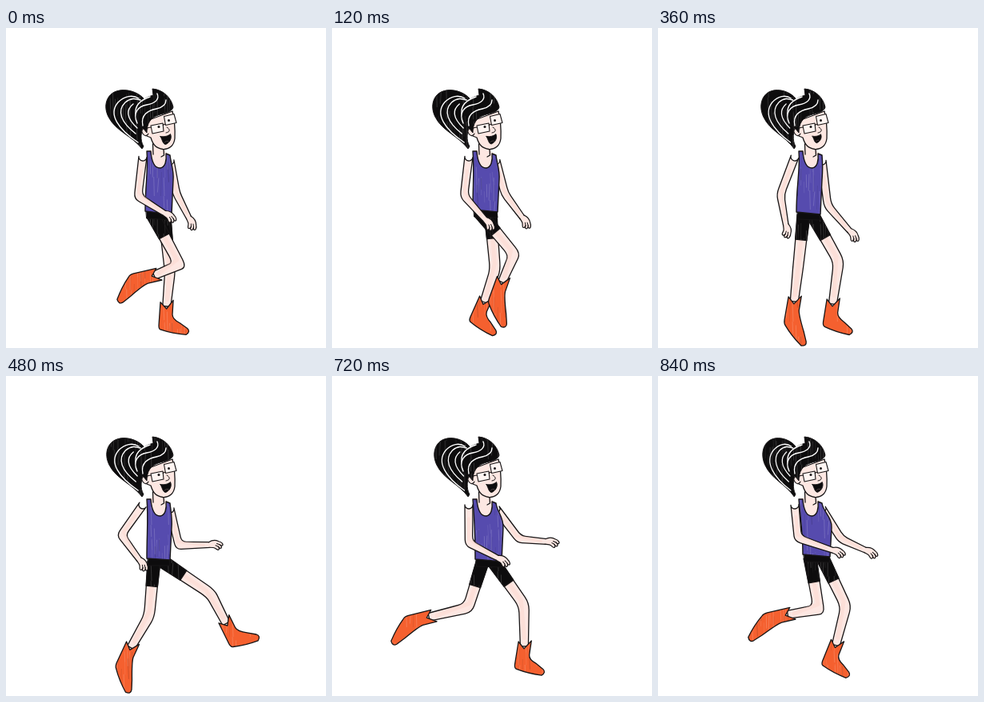
An HTML page that plays this animation: 400x400 px, repeating every 960 ms.

```html
<!DOCTYPE html>
<html lang="en">
<head>
<meta charset="utf-8">
<title>Runner</title>
<style>
html, body { margin: 0; width: 100%; height: 100%; overflow: hidden; background: #fff; }
svg { display: block; width: 100%; height: 100%; }
</style>
</head>
<body>
<svg viewBox="0 0 400 400" stroke-linejoin="round" stroke-linecap="round">
  <defs>
    <pattern id="grain" width="34" height="70" patternUnits="userSpaceOnUse"></pattern>
  </defs>
  <g id="runner"></g>
</svg>
<script>
const STEP = 120;
const INK = '#171516', SKIN = '#fde7e2', BLUSH = '#f8cfc6', BLUE = '#564bae', ORANGE = '#f5602f', HAIR = '#0d0c0d';
const runner = document.getElementById('runner');
const grain = document.getElementById('grain');

// Leg: knee x y, boot top x y, shaft angle, sole angle
const nearLeg = [
  [217, 296, 190, 308, 165, 117],
  [228, 283, 214, 313, 108, 62],
  [228, 265, 234, 285, 70, 30],
  [175, 300, 171, 337, 98, 52],
  [179, 300, 158, 335, 113, 68],
  [172, 297, 136, 316, 147, 101],
  [170, 290, 126, 300, 164, 119],
  [201, 292, 167, 297, 165, 123]
];
const farLeg = [
  [205, 305, 201, 343, 92, 11],
  [204, 302, 192, 338, 112, 32],
  [201, 300, 180, 332, 132, 52],
  [226, 292, 219, 340, 97, 18],
  [256, 272, 273, 305, 62, -14],
  [241, 283, 255, 332, 85, 3],
  [240, 286, 241, 333, 97, 14],
  [235, 288, 224, 332, 110, 28]
];
// Arm: elbow x y, wrist x y
const nearArm = [
  [165, 211, 199, 232], [165, 210, 192, 240], [167, 210, 184, 248], [153, 208, 160, 247],
  [144, 199, 167, 230], [168, 215, 195, 238], [171, 209, 208, 228], [175, 203, 219, 218]
];
const farArm = [
  [213, 207, 229, 238], [216, 207, 238, 237], [219, 207, 248, 235], [212, 222, 240, 254],
  [216, 212, 255, 211], [236, 204, 271, 195], [234, 204, 268, 207], [229, 204, 260, 218]
];
// Vest hem: left x y, right x y
const hem = [
  [174, 229, 207, 233], [176, 227, 207, 230], [177, 225, 207, 227], [173, 230, 203, 233],
  [176, 228, 205, 230], [177, 234, 210, 237], [179, 229, 212, 232], [181, 223, 215, 226]
];
const tailLeft = [125, 126, 127, 129, 126, 125, 128, 131];
const mouthSize = [1, .95, .92, .84, 1, 1.05, 1, .98];

const n = v => v.toFixed(1);
const P = p => n(p[0]) + ' ' + n(p[1]);
const mix = (a, b, t) => [a[0] + (b[0] - a[0]) * t, a[1] + (b[1] - a[1]) * t];
const dir = (a, b) => { const x = b[0] - a[0], y = b[1] - a[1], d = Math.hypot(x, y); return [x / d, y / d]; };
const polar = deg => [Math.cos(deg * Math.PI / 180), Math.sin(deg * Math.PI / 180)];
const move = (p, u, a, v = u, b = 0) => [p[0] + u[0] * a + v[0] * b, p[1] + u[1] * a + v[1] * b];
const path = (d, fill = 'none', stroke = INK, w = 1.3) =>
  `<path d="${d}" fill="${fill}" stroke="${stroke}" stroke-width="${w}"/>`;
const crayon = (d, fill, w) => path(d, fill, 'none', 0) + path(d, 'url(#grain)', INK, w);

// Tapered two-segment limb with a softened joint
function limb(a, b, c, wa, wb, wc) {
  const u = dir(a, b), v = dir(b, c);
  const nu = [-u[1], u[0]], nv = [-v[1], v[0]];
  const m = dir([0, 0], [nu[0] + nv[0], nu[1] + nv[1]]);
  const k = wb / Math.max(.7, m[0] * nu[0] + m[1] * nu[1]);
  const side = s => [move(a, nu, s * wa), move(b, m, s * k), move(c, nv, s * wc)];
  const [l0, l1, l2] = side(1), [r0, r1, r2] = side(-1);
  const d = `M${P(l0)}L${P(mix(l0, l1, .86))}Q${P(l1)} ${P(mix(l1, l2, .16))}L${P(l2)}L${P(r2)}` +
    `L${P(mix(r2, r1, .84))}Q${P(r1)} ${P(mix(r1, r0, .14))}L${P(r0)}A${wa} ${wa} 0 0 1 ${P(l0)}Z`;
  const shade = `M${P(mix(a, b, .35))}L${P(mix(a, b, .9))}L${P(mix(b, c, .8))}`;
  return path(d, SKIN) + `<g opacity=".35">${path(shade, 'none', BLUSH, wc)}</g>`;
}

function hand(from, wrist, flip) {
  const u = dir(from, wrist), deg = Math.atan2(u[1], u[0]) * 180 / Math.PI;
  return `<g transform="translate(${P(wrist)}) rotate(${n(deg)}) scale(1 ${flip})">` +
    path('M-1.5 -3.2C3 -6 8 -5.5 11 -4C15 -3 17 0 15.5 1.2C14.5 2 13 .5 12 0C15 2 15 4.5 13 4.8C12 5 11 3 10 2.4' +
      'C12 4.5 11.5 6.8 9.8 6.6C7.5 6.2 7 4 4 3.6L-1.5 3.2', SKIN, INK, 1.2) +
    path('M12 0L8.5 -1.2M10 2.4L7 1', 'none', INK, 1) + '</g>';
}

function arm(shoulder, [ex, ey, wx, wy], flip) {
  return limb(shoulder, [ex, ey], [wx, wy], 5, 4.6, 3.3) + hand([ex, ey], [wx, wy], flip);
}

function boot(top, shaft, sole) {
  const u = polar(shaft), v = [u[1], -u[0]], f = polar(sole), up = [f[1], -f[0]];
  const at = (a, b) => move(top, u, a, v, b);
  const heel = at(34, -9), toe = move(heel, f, 37);
  const d = `M${P(at(0, -8))}L${P(at(8, 0))}L${P(at(-3, 8))}L${P(at(15, 7.5))}` +
    `Q${P(at(21, 8))} ${P(move(heel, f, 24, up, 13))}L${P(move(toe, up, 8, f, -2))}` +
    `Q${P(move(toe, up, 5, f, 3))} ${P(move(toe, f, -2))}` +
    `Q${P(move(heel, f, 18, up, -2))} ${P(move(heel, f, 3))}Q${P(heel)} ${P(at(29, -9))}Z`;
  return crayon(d, ORANGE, 1.3);
}

function leg(hip, [kx, ky, ax, ay, shaft, sole], hipW) {
  const knee = [kx, ky], top = [ax, ay], u = dir(hip, knee), s = [-u[1], u[0]];
  const end = move(hip, u, 31);
  const cuff = `M${P(move(hip, s, hipW))}L${P(move(end, s, 7.2))}L${P(move(end, s, -7.2))}L${P(move(hip, s, -hipW))}Z`;
  return limb(hip, knee, move(top, polar(shaft), 5), 7.5, 6.4, 5) +
    boot(top, shaft, sole) + path(cuff, HAIR) + path(cuff, 'url(#grain)', 'none', 0);
}

function vest([lx, ly, rx, ry]) {
  return path('M176 155L184 150L198 153L206 160L206 180L177 180Z', SKIN, 'none', 0) +
    crayon(`M176 154L181 154C182 167 186 175.5 193 175C199 174 201 166 200 157L205 159` +
      `C206 169 ${rx + 3} 177 ${rx + 2} 190L${rx} ${ry}L${lx} ${ly}C${lx} 195 178 178 176 154Z`, BLUE, 1.4);
}

function head(i) {
  const sx = (172 - tailLeft[i]) / 47;
  const tail = 'M172 88C165 80 150 75 138 79C126 83 121 97 128 111C137 129 158 135 170 151L172 148C167 140 169 130 172 120Z';
  const strands = ['M165 143C141 127 127 108 140 93C148 85 158 83 166 88',
    'M162 132C144 118 138 104 149 93C156 87 162 88 168 90', 'M164 125C150 112 150 102 159 95'];
  const fringe = 'M162 114C160 99 167 89 184 84L183 76C197 77 207 88 209 99C207 106 198 106 190 109' +
    'C181 112 176 119 176 131L172 126C168 123 164 120 162 114Z';
  const white = d => path(d, 'none', '#fff', 1.4);
  return path('M183 138L183 160L198 163L198 148Z', SKIN, 'none', 0) +
    path('M183.5 145L184 158M197 151L197.5 159L194 161') +
    `<g transform="translate(172 0) scale(${n(sx * 100) / 100} 1) translate(-172 0)">` +
    crayon(tail, HAIR, 1) + strands.map(white).join('') + '</g>' +
    path('M176 116L208 104C210 112 211.5 126 211 138C210 147 204 152 196 151.5C188 150 184 147 181 137L176 135Z', SKIN) +
    path('M177 126C172 123 168 128 171 132C173 136 177 135 178 132', SKIN, INK, 1.1) +
    crayon(fringe, HAIR, 1) +
    ['M164 119C158 106 165 98 176 96C187 94 192 89 189 82', 'M171 122C168 108 178 103 188 101C197 99 200 95 200 90',
      'M162 107C161 97 168 90 180 86'].map(white).join('') +
    path('M181 122L196 119L197 129L183 132ZM197.5 110.5L210 107.5L213 118.5L199.5 121.5ZM196 121.5L199 120M181 124L176 125', '#fff5f2', INK, 1.1) +
    `<circle cx="191" cy="123.5" r="1.5" fill="${INK}"/><circle cx="203.5" cy="115.5" r="1.5" fill="${INK}"/>` +
    path('M201 124C205 126 206 130 200 131', 'none', INK, 1) +
    `<g transform="translate(193 134) scale(${mouthSize[i]})">` +
    path('M0 1.5C5 2.5 10 1 12.5 -1.5C15 4 11 10 6.5 11.5C3 11 3 7 0 1.5Z', HAIR, INK, 1) +
    path('M5 9.3C6 7.5 8.5 7 10 7.6', 'none', '#5a4a4c', .9) + '</g>';
}

// Pencil streaks, repeated over every coloured area
function makeGrain() {
  let seed = 11, out = '';
  const rnd = () => (seed = seed * 16807 % 2147483647) / 2147483647;
  for (let k = 0; k < 20; k++) {
    const x = rnd() * 34, y = rnd() * 50, h = 10 + rnd() * 22;
    out += `<g opacity="${n(.1 + rnd() * .12)}">${path(`M${n(x)} ${n(y)}l${n(rnd() * 3 - 1.5)} ${n(h)}`, 'none', k % 4 ? '#fff' : '#000', .8)}</g>`;
  }
  grain.innerHTML = out;
}

function draw(i) {
  const h = hem[i];
  const nearHip = [h[0] + 9, h[1] + 4], farHip = [h[2] - 9, h[3] + 2];
  grain.setAttribute('patternTransform', `translate(${i * 13 % 34} ${i * 29 % 70})`);
  runner.innerHTML =
    arm([205, 166], farArm[i], 1) +
    leg(farHip, farLeg[i], 8) +
    leg(nearHip, nearLeg[i], 8) +
    path(`M${h[0] + 1} ${h[1] - 3}L${h[2] - 1} ${h[3] - 3}L${h[2]} ${h[3] + 7}L${h[0] + 2} ${h[1] + 9}Z`, HAIR, INK, 1) +
    vest(h) +
    arm([171, 161], nearArm[i], 1) +
    head(i);
}

let shown = -1;
const start = performance.now();
function tick() {
  const i = Math.floor(Math.max(0, performance.now() - start) / STEP) % hem.length;
  if (i !== shown) draw(shown = i);
  requestAnimationFrame(tick);
}
makeGrain();
tick();
</script>
</body>
</html>
```
